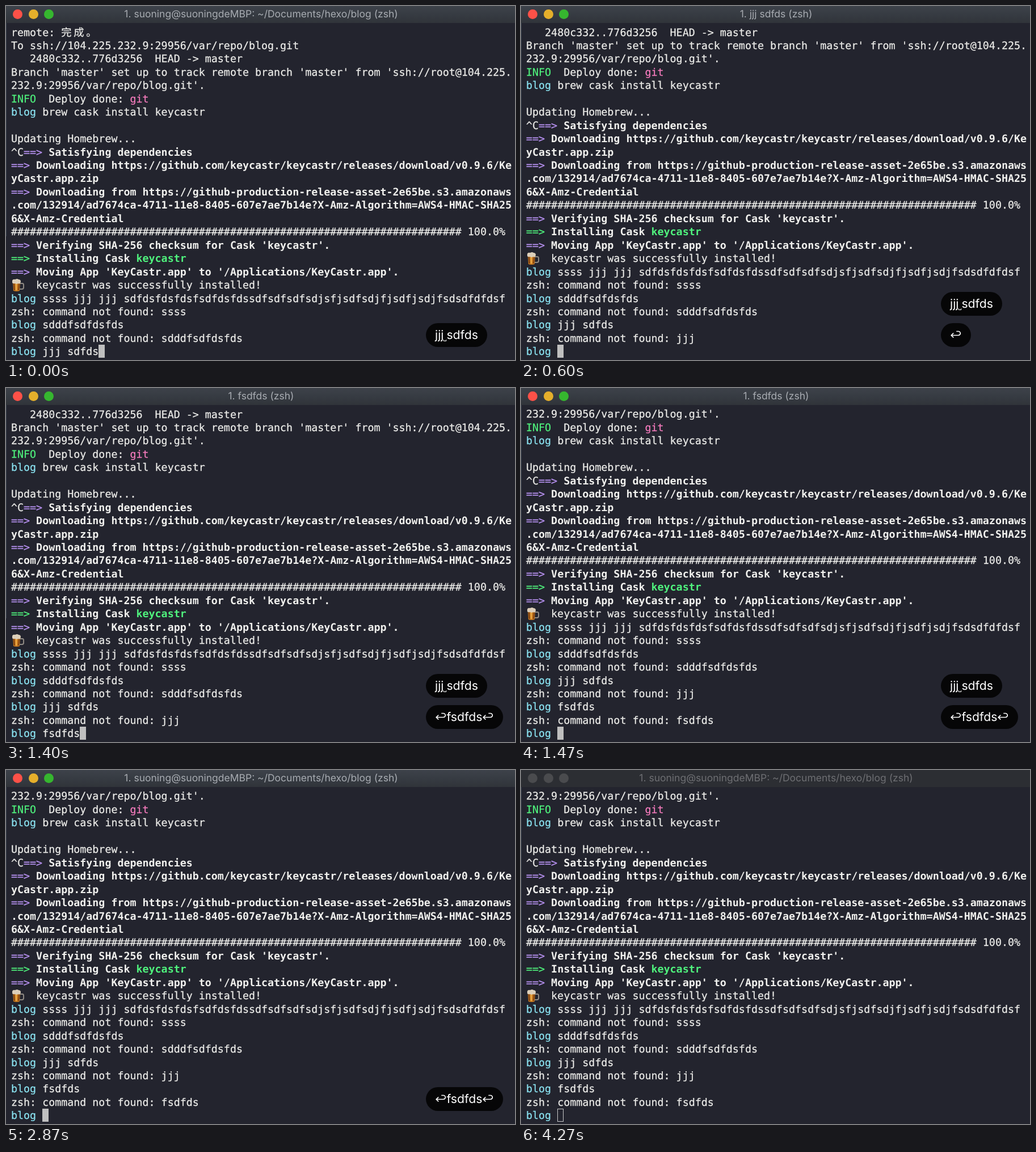
These frames come from a looping animation (897 by 624 pixels, 4.34 s). An HTML page:

```html
<!DOCTYPE html>
<html lang="en">
<head>
<meta charset="utf-8">
<title>Terminal</title>
<style>
html, body { margin: 0; width: 100%; height: 100%; overflow: hidden; background: #23242e; }
#stage {
  position: relative; width: 897px; height: 624px; overflow: hidden;
  background: #23242e; text-rendering: geometricPrecision;
}
#edge { position: absolute; left: 0; top: 30px; width: 1px; height: 376px; background: #39414f; }
#bar {
  position: absolute; left: 0; top: 0; width: 897px; height: 30px;
  background: linear-gradient(#3d424a, #30343a);
}
#bar u { position: absolute; top: 5.5px; width: 17px; height: 17px; border-radius: 50%; }
#bar u:nth-child(1) { left: 12px; background: #fd5148; }
#bar u:nth-child(2) { left: 39.5px; background: #e5af2b; }
#bar u:nth-child(3) { left: 67px; background: #36b62f; }
#title {
  position: absolute; left: 0; width: 899px; top: 0; line-height: 29px; text-align: center;
  font-family: Inter, Roboto, sans-serif; font-size: 17.5px; color: #a8acb2; white-space: pre;
}
.idle #bar { background: #2c2e33; }
.idle #bar u { background: #4a4b4e; }
.idle #title { color: #6e6f73; }
#screen { position: absolute; left: 0; top: 34px; width: 897px; height: 588px; overflow: hidden; }
#log {
  position: absolute; left: 9px; margin: 0; color: #ededea;
  font-family: "DejaVu Sans Mono", "Noto Sans CJK SC", "Noto Sans CJK", monospace;
  font-size: 18.32px; line-height: 23.46px; -webkit-text-stroke: .25px;
}
#log b { color: #f1f1ee; -webkit-text-stroke: 0; }
#log .c { color: #8be4f2; }
#log .g { color: #4ff27d; }
#log .p { color: #b992f3; }
#log .k { color: #f57bbd; }
#log .wide { letter-spacing: 3.74px; }
#log svg { display: inline-block; width: 22.06px; height: 23px; vertical-align: top; overflow: visible; }
#cursor {
  position: absolute; top: 597px; width: 11px; height: 23px; box-sizing: border-box;
  background: #bfbfbf; border: 0 solid #c8c8c8;
}
.idle #cursor { background: none; border-width: 1.5px; }
.keys {
  position: absolute; left: 740px; top: 559px; height: 42px; padding: 0 16px;
  border-radius: 21px; background: rgba(0, 0, 0, .84); color: #fff;
  font-family: Inter, Roboto, sans-serif; font-size: 21.2px; line-height: 42px; white-space: pre;
}
.keys .gap {
  display: inline-block; width: 5px; height: 3px; vertical-align: -4px;
  border: solid #fff; border-width: 0 1px 1px; box-sizing: border-box;
}
.keys svg { width: 20.5px; height: 42px; vertical-align: top; fill: none; stroke: #fff; stroke-width: 1.7; }
</style>
</head>
<body>
<div id="stage">
<div id="edge"></div>
<div id="screen"><pre id="log">remote: <span class="wide">完成。</span>
To ssh://104.225.232.9:29956/var/repo/blog.git
   2480c332..776d3256  HEAD -&gt; master
Branch 'master' set up to track remote branch 'master' from 'ssh://root@104.225.
232.9:29956/var/repo/blog.git'.
<span class="g">INFO</span>  Deploy done: <span class="k">git</span>
<span class="c">blog</span> brew cask install keycastr

Updating Homebrew...
^C<span class="p">==&gt;</span> <b>Satisfying dependencies</b>
<span class="p">==&gt;</span> <b>Downloading https://github.com/keycastr/keycastr/releases/download/v0.9.6/Ke</b>
<b>yCastr.app.zip</b>
<span class="p">==&gt;</span> <b>Downloading from https://github-production-release-asset-2e65be.s3.amazonaws</b>
<b>.com/132914/ad7674ca-4711-11e8-8405-607e7ae7b14e?X-Amz-Algorithm=AWS4-HMAC-SHA25</b>
<b>6&amp;X-Amz-Credential</b>
<span id="hashes"></span> 100.0%
<span class="p">==&gt;</span> <b>Verifying SHA-256 checksum for Cask 'keycastr'.</b>
<span class="g">==&gt;</span> <b>Installing Cask <span class="g">keycastr</span></b>
<span class="p">==&gt;</span> <b>Moving App 'KeyCastr.app' to '/Applications/KeyCastr.app'.</b>
<svg viewBox="0 0 22 23"><path d="M16 8h4q2 0 2 3v4q0 3-3 3h-4" fill="none" stroke="#8f8a84" stroke-width="2"/><path d="M3 4h13l-1 17q-5 2-11 0z" fill="#c87a20"/><path d="M5 8l1 12M14 8l-1 12" stroke="#7c3f10" stroke-width="2"/><path d="M9 9v11" stroke="#eeb04a" stroke-width="2"/><path d="M2 3q1-3 5-2 4-2 6 0 4 0 4 4l-1 3q-2 1-4 0-2 2-5 0-3 1-5-1z" fill="#dccfba"/></svg>  keycastr was successfully installed!
<span class="c">blog</span> ssss jjj jjj sdfdsfdsfdsfsdfdsfdssdfsdfsdfsdjsfjsdfsdjfjsdfjsdjfsdsdfdfdsf
zsh: command not found: ssss
<span class="c">blog</span> sdddfsdfdsfds
zsh: command not found: sdddfsdfdsfds
<span class="c">blog</span> jjj sdfds
zsh: command not found: jjj
<span class="c">blog</span> <span id="typed"></span>
zsh: command not found: fsdfds
<span class="c">blog</span> </pre></div>
<div id="cursor"></div>
<div id="bar"><u></u><u></u><u></u><div id="title"></div></div>
<div class="keys" id="first">jjj<span class="gap"></span>sdfds</div>
<div class="keys" id="second"><svg viewBox="0 0 20 42"><path id="enter" d="M11 14.500H14.500a3.500 3.500 0 0 1 0 7H2M6 17.500L2 21.500L6 25.500"/></svg><span id="echo"></span><svg id="again" viewBox="0 0 20 42"><use href="#enter"/></svg></div>
</div>
<script>
const LOOP = 4340, ROW = 23.46, COL = 11.03, LOG_TOP = 1.5;
const WORD = 'fsdfds';
const KEY_TIMES = [860, 925, 990, 1060, 1125, 1190];
const ENTER = [460, 1325], RUN = [520, 1390], OUTPUT = [590, 1455], PROMPT = [660, 1525];
const FADE = [1730, 3345], FADE_MS = 200, BLUR = 3600;
const HOME = '1. suoning@suoningdeMBP: ~/Documents/hexo/blog (zsh)';

const $ = id => document.getElementById(id);
const passed = (times, t) => times.filter(x => t >= x).length;
const fade = (from, t) => Math.min(1, Math.max(0, 1 - (t - from) / FADE_MS));
const setText = (id, text) => { if ($(id).textContent !== text) $(id).textContent = text; };

function titleAt(t) {
  const n = passed(RUN, t);
  if (n === passed(PROMPT, t)) return HOME;
  return `1. ${n === 1 ? 'jjj sdfds' : WORD} (zsh)`;
}

function render(t) {
  const outputs = passed(OUTPUT, t);
  const typed = WORD.slice(0, passed(KEY_TIMES, t));
  const column = [14, 5 + typed.length, 5][outputs];
  const entered = passed(ENTER, t);

  $('stage').classList.toggle('idle', t >= BLUR);
  setText('title', titleAt(t));
  setText('typed', typed);
  setText('echo', typed);
  $('log').style.top = LOG_TOP - outputs * 2 * ROW + 'px';
  $('cursor').style.left = 9 + column * COL + 'px';

  $('first').style.top = (entered ? 504 : 559) + 'px';
  $('first').style.opacity = fade(FADE[0], t);
  $('second').style.opacity = entered ? fade(FADE[1], t) : 0;
  $('again').style.display = entered > 1 ? '' : 'none';
}

$('hashes').textContent = '#'.repeat(72);
const start = performance.now();
function tick(now) {
  render(Math.max(0, now - start) % LOOP);
  requestAnimationFrame(tick);
}
render(0);
requestAnimationFrame(tick);
</script>
</body>
</html>
```
